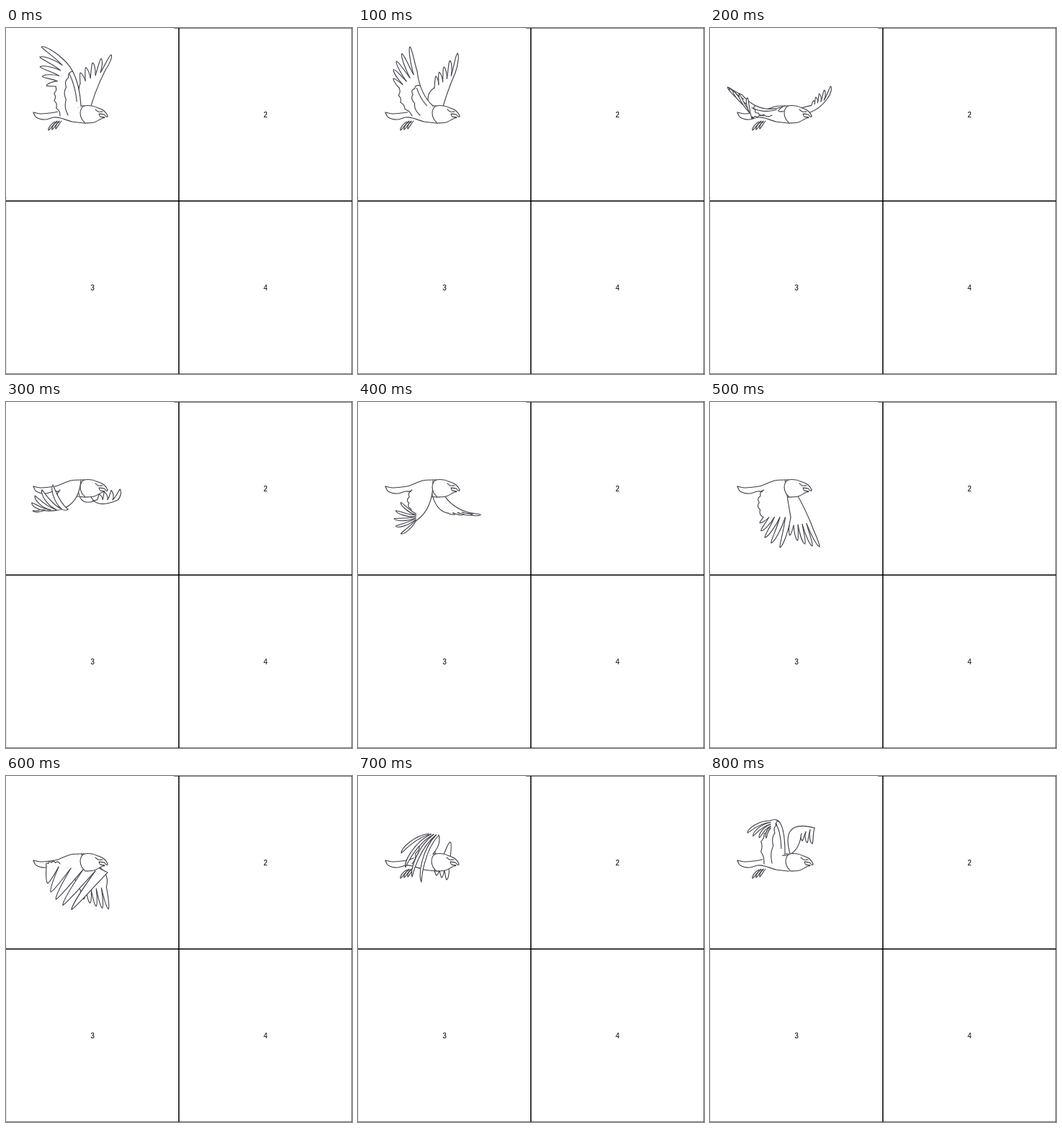
These frames come from a looping animation (480x480 px, 0.9 s). An HTML page with a canvas:

```html
<!DOCTYPE html>
<html lang="en">
<head>
<meta charset="utf-8">
<title>Flying eagle</title>
<style>
  html, body { margin: 0; width: 100%; height: 100%; overflow: hidden; background: #fff; }
  canvas { display: block; width: 480px; height: 480px; }
</style>
</head>
<body>
<canvas id="stage" width="480" height="480"></canvas>
<script>
const ctx = document.getElementById('stage').getContext('2d');
const STEP = 100;
const INK = '#3c3c46';

// Each wing hangs between a fixed shoulder and hip.
const NEAR = { shoulder: [104, 108], hip: [75, 122] };
const FAR = { shoulder: [115, 120], hip: [100, 110] };

const lerp = (a, b, k) => a + (b - a) * k;
const between = (p, q, k) => [lerp(p[0], q[0], k), lerp(p[1], q[1], k)];
const quad = (a, c, b, k) => between(between(a, c, k), between(c, b, k), k);

// lead, trail: control points of the edges; root: feather bases; tips: arc of the feather ends.
const wing = (joint, count, bend, lead, root, tips, trail) =>
  ({ joint, count, bend, points: [lead, ...root, ...tips, trail] });

const raised = {
  feet: true,
  near: wing(NEAR, 5, .08, [101, 62], [[80, 44], [69, 81]], [[49, 26], [42, 55], [56, 80]], [62, 100]),
  far: wing(FAR, 5, .05, [121, 92], [[138, 58], [103, 77]], [[146, 37], [116, 47], [103, 62]], [100, 82])
};
const upright = {
  feet: true,
  near: wing(NEAR, 5, -.03, [86, 92], [[82, 60], [57, 83]], [[72, 26], [46, 44], [49, 70]], [52, 104]),
  far: wing(FAR, 5, .05, [122, 92], [[135, 62], [106, 83]], [[138, 35], [115, 57], [108, 67]], [92, 92])
};
const level = {
  near: wing(NEAR, 5, -.18, [100, 158], [[46, 150], [86, 149]], [[37, 151], [29, 127], [65, 115]], [66, 147]),
  far: wing(FAR, 4, .18, [118, 152], [[155, 136], [127, 135]], [[158, 121], [138, 123], [129, 128]], [98, 150])
};
const bottom = {
  near: wing(NEAR, 5, -.06, [108, 138], [[112, 160], [74, 160]], [[97, 202], [69, 191], [69, 168]], [62, 138]),
  far: wing(FAR, 5, .03, [126, 135], [[140, 168], [110, 172]], [[152, 201], [132, 201], [111, 185]], [108, 150])
};
const arched = {
  feet: true, nod: -1,
  near: wing(NEAR, 4, .18, [116, 94], [[112, 82], [98, 80]], [[88, 147], [66, 141], [60, 107]], [84, 90]),
  far: wing(FAR, 3, -.08, [136, 60], [[126, 128], [106, 131]], [[123, 144], [116, 141], [109, 138]], [110, 84])
};
const rising = {
  feet: true, nod: 2,
  near: wing(NEAR, 4, .2, [104, 52], [[84, 62], [84, 72]], [[52, 79], [63, 87], [78, 86]], [62, 85]),
  far: wing(FAR, 3, .12, [92, 58], [[145, 72], [127, 80]], [[142, 94], [135, 93], [128, 90]], [122, 112])
};

// Swing a point around its shoulder from p towards q.
function swing([ox, oy], p, q, k) {
  const a = Math.atan2(p[1] - oy, p[0] - ox);
  const b = Math.atan2(q[1] - oy, q[0] - ox);
  const turn = Math.atan2(Math.sin(b - a), Math.cos(b - a));
  const r = lerp(Math.hypot(p[0] - ox, p[1] - oy), Math.hypot(q[0] - ox, q[1] - oy), k);
  return [ox + r * Math.cos(a + turn * k), oy + r * Math.sin(a + turn * k)];
}

function mix(p, q, k) {
  const blend = (v, w) => ({
    ...v,
    bend: lerp(v.bend, w.bend, k),
    points: v.points.map((pt, i) => swing(v.joint.shoulder, pt, w.points[i], k))
  });
  return { ...p, near: blend(p.near, q.near), far: blend(p.far, q.far) };
}

const poses = [raised, upright, mix(upright, level, .5), level, mix(level, bottom, .5),
  bottom, mix(bottom, arched, .3), arched, rising];

// Smooth curve through "x y x y ...".
function spline(text) {
  const v = text.split(' ').map(Number);
  const last = v.length / 2 - 1;
  const at = i => {
    const k = Math.max(0, Math.min(last, i)) * 2;
    return [v[k], v[k + 1]];
  };
  const path = new Path2D();
  path.moveTo(...at(0));
  for (let i = 0; i < last; i++) {
    const [a, b, c, d] = [at(i - 1), at(i), at(i + 1), at(i + 2)];
    path.bezierCurveTo(
      b[0] + (c[0] - a[0]) / 6, b[1] + (c[1] - a[1]) / 6,
      c[0] - (d[0] - b[0]) / 6, c[1] - (d[1] - b[1]) / 6, ...c);
  }
  return path;
}

const back = spline('38 117 48 119 60 118 72 116 90 109 109 108');
const belly = spline('38 117 42 124 54 127 66 124 76 125 92 130 110 132');
const skull = spline('110 132 105 126 103 118 105 111 109 108 119 108 128 111 136 115 141 122 139 123 136 120 129 119');
const jaw = spline('129 119 131 123 137 124 132 126 122 131 110 132');
const brow = spline('124 113 128 116 134 116');

function paint(path) {
  ctx.fill(path);
  ctx.stroke(path);
}

// Two bent edges that meet in a rounded tip.
function feather(base, tip, end, bend) {
  const dx = tip[0] - (base[0] + end[0]) / 2, dy = tip[1] - (base[1] + end[1]) / 2;
  const len = Math.hypot(dx, dy);
  const nx = -dy / len, ny = dx / len;
  const side = Math.sign((base[0] - end[0]) * nx + (base[1] - end[1]) * ny) || 1;
  const round = Math.min(2.6, len * .1);
  const ctrl = (p, k, off) => {
    const [x, y] = between(p, tip, k);
    return [x + nx * off, y + ny * off];
  };
  const edge = (p, s) => [ctrl(p, .4, bend * len + s), ctrl(p, .92, bend * len * .35 + s * round)];
  const [a, b] = edge(base, side);
  const [c, d] = edge(end, -side);
  const path = new Path2D();
  path.moveTo(...base);
  path.bezierCurveTo(...a, ...b, ...tip);
  path.bezierCurveTo(...d, ...c, ...end);
  paint(path);
}

// Row of small bumps along a quadratic curve.
function scallops(a, c, b, height) {
  const path = new Path2D();
  const n = 24;
  for (let i = 0; i <= n; i++) {
    const k = i / n;
    const [x, y] = quad(a, c, b, k);
    const [p, q] = [between(a, c, k), between(c, b, k)];
    const len = Math.hypot(q[0] - p[0], q[1] - p[1]) || 1;
    const off = height * Math.abs(Math.sin(k * Math.PI * 4));
    path.lineTo(x + (q[1] - p[1]) / len * off, y - (q[0] - p[0]) / len * off);
  }
  ctx.stroke(path);
}

function drawWing({ joint, count, bend, points }, bumps) {
  const { shoulder, hip } = joint;
  const [lead, root, rootEnd, tip, tipMid, tipEnd, trail] = points;
  const web = new Path2D();
  web.moveTo(...shoulder);
  web.quadraticCurveTo(...lead, ...root);
  const edge = new Path2D(web);
  web.lineTo(...rootEnd);
  web.quadraticCurveTo(...trail, ...hip);
  ctx.fill(web);
  ctx.stroke(edge);
  scallops(rootEnd, trail, hip, bumps);
  for (let i = 0; i < count; i++) {
    feather(between(root, rootEnd, i / count), quad(tip, tipMid, tipEnd, i / (count - 1)),
      between(root, rootEnd, (i + 1) / count), bend);
  }
}

// Short feathers show on the inside of a lifted wing.
function drawCoverts({ joint, points }) {
  const [lead, root, rootEnd, , tipMid] = points;
  if (tipMid[1] > joint.shoulder[1]) return;
  const top = quad(joint.shoulder, lead, root, .65);
  const low = [joint.hip[0] + 11, joint.hip[1] - 1];
  scallops(top, between(between(root, rootEnd, .9), lead, .25), low, -2);
  const vane = new Path2D();
  for (let k = .1; k < .7; k += .05) {
    const [x, y] = quad(joint.shoulder, lead, root, k);
    vane.lineTo(x - 5, y + 3);
  }
  ctx.stroke(vane);
}

function drawFeet() {
  for (let i = 0; i < 3; i++) {
    feather([68 + 3 * i, 130], [59 + 5 * i, 142 - i], [71 + 3 * i, 129], .12);
  }
}

function drawHead(nod) {
  ctx.save();
  ctx.translate(nod, 0);
  const face = new Path2D(skull);
  face.addPath(jaw);
  ctx.fill(skull);
  paint(face);
  ctx.stroke(brow);
  ctx.restore();
}

function drawBird({ near, far, feet, nod = 0 }) {
  ctx.strokeStyle = INK;
  ctx.fillStyle = '#fff';
  ctx.lineWidth = 1.1;
  ctx.lineCap = ctx.lineJoin = 'round';
  drawWing(far, 0);
  if (feet) drawFeet();
  paint(belly);
  paint(back);
  drawWing(near, 2);
  drawCoverts(near);
  drawHead(nod);
}

function drawGrid() {
  ctx.strokeStyle = '#000';
  ctx.lineWidth = 1;
  ctx.font = '10px "Liberation Sans", Arial, sans-serif';
  ctx.textAlign = 'center';
  for (let i = 0; i < 4; i++) {
    const x = i % 2 * 240, y = (i >> 1) * 240;
    ctx.strokeRect(x, y, 240, 240);
    ctx.fillStyle = '#000';
    if (i) ctx.fillText(i + 1, x + 120, y + 124);
  }
  ctx.fillStyle = '#fff';
  ctx.fillRect(0, 0, 233, 234);
}

const start = performance.now();
function draw() {
  const t = Math.max(0, performance.now() - start);
  ctx.fillStyle = '#fff';
  ctx.fillRect(0, 0, 480, 480);
  drawGrid();
  drawBird(poses[Math.floor(t / STEP) % poses.length]);
  requestAnimationFrame(draw);
}
draw();
</script>
</body>
</html>
```
